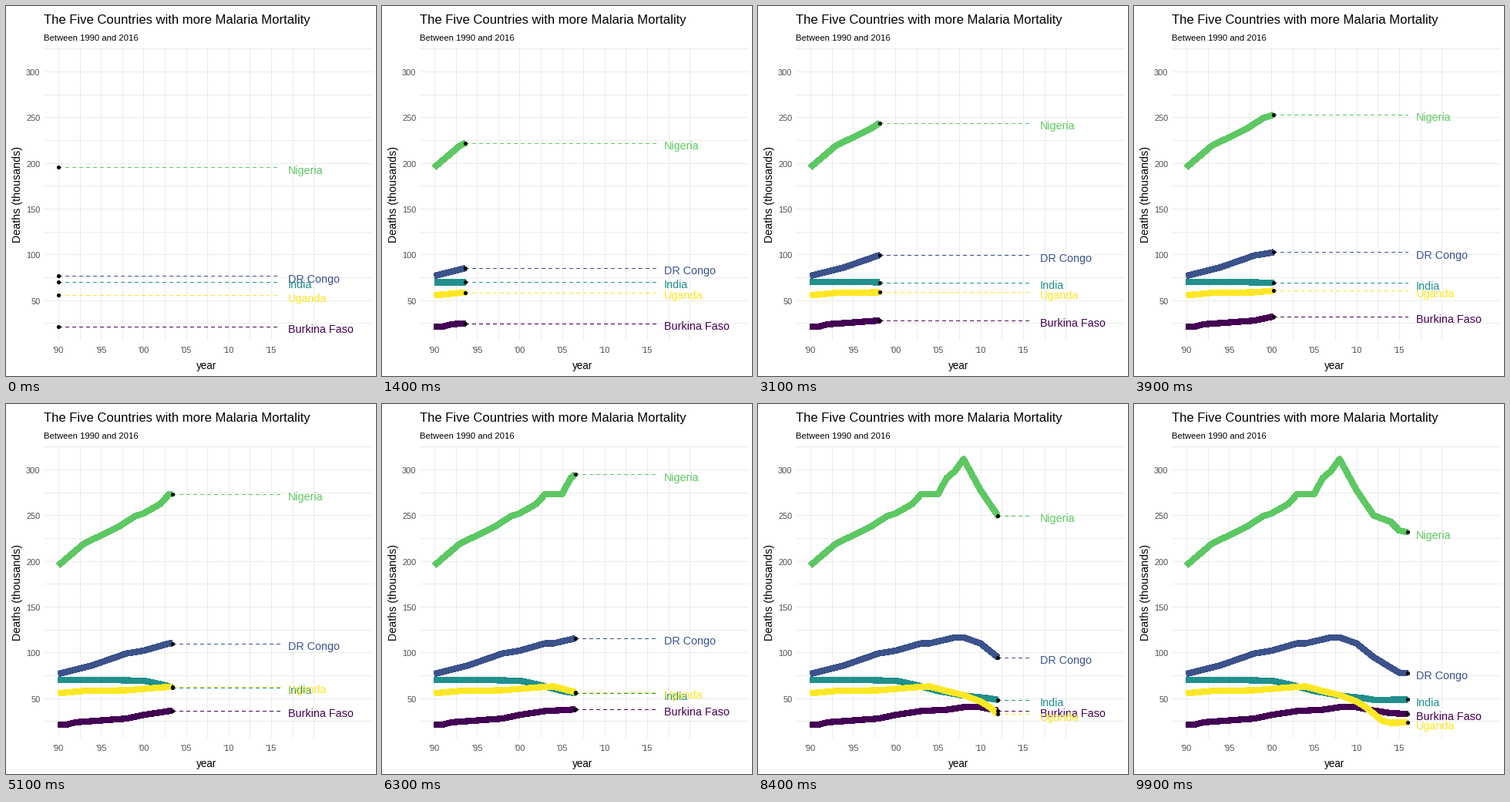
These frames come from a looping animation (480 by 480 pixels, 10000 ms). A matplotlib script:

```python
import numpy as np
import matplotlib.pyplot as plt
from matplotlib.animation import FuncAnimation

SIZE, DPI = 480, 72  # at 72 dpi one point is one pixel
FRAMES, INTERVAL = 100, 100
SPAN = 26
GRID, TICK = "#EBEBEB", "#4D4D4D"

plt.rcParams["font.family"] = "Liberation Sans"

# Turning points of each curve: (years since 1990, thousand deaths)
COUNTRIES = {
    "Burkina Faso": ("#440154", [
        (0, 21.3), (1, 21.3), (2, 23.7), (8, 27.8), (10, 31.8), (13, 36),
        (16, 37.5), (18, 40.2), (20, 40.2), (22, 36.6), (24, 33.8), (26, 32.8)]),
    "DR Congo": ("#3B528B", [
        (0, 76.6), (4, 86), (8, 99), (10, 102), (13, 110), (14, 110),
        (17, 116.5), (18, 116.5), (20, 110), (22, 95), (25, 78), (26, 77.7)]),
    "India": ("#21908C", [
        (0, 70.2), (4, 70.2), (10, 69.3), (12, 65.5), (15, 58), (18, 53),
        (21, 50), (22, 48.3), (26, 48.6)]),
    "Nigeria": ("#5DC863", [
        (0, 195.3), (3, 219), (7, 237), (9, 249), (10, 252), (12, 262.5),
        (13, 273), (15, 273), (16, 290.5), (17, 298.5), (18, 311.5), (20, 277.5),
        (22, 250), (24, 243), (25, 233.5), (26, 231.5)]),
    "Uganda": ("#FDE725", [
        (0, 55.5), (3, 58), (8, 58.7), (12, 61.8), (14, 63), (16, 58),
        (18, 53.5), (20, 46.5), (21, 41), (23, 25.5), (24, 23.2), (26, 23.5)]),
}


def px(year):
    return 67.9 + 11.04 * np.asarray(year)


def py(deaths):
    return 441.1 - 1.1866 * np.asarray(deaths)


fig = plt.figure(figsize=(SIZE / DPI, SIZE / DPI), dpi=DPI, facecolor="white")
ax = fig.add_axes([0, 0, 1, 1])
ax.set(xlim=(0, SIZE), ylim=(SIZE, 0))
ax.axis("off")


def label(x, y, text, size, color="black", **kw):
    return ax.text(x, y, text, fontsize=size, color=color, **kw)


def draw_grid():
    for v in range(25, 326, 25):
        ax.plot([49, 475], [py(v)] * 2, color=GRID, lw=1, zorder=1)
    for k in np.arange(0, 31, 2.5):
        ax.plot([px(k)] * 2, [54.5, 432.5], color=GRID, lw=1, zorder=1)


def draw_labels():
    for v in range(50, 301, 50):
        label(44.5, py(v) + 4.8, str(v), 11, TICK, ha="right")
    for k in range(0, 26, 5):
        label(px(k), 450, f"'{(90 + k) % 100:02d}", 11, TICK, ha="center")
    label(49, 23.5, "The Five Countries with more Malaria Mortality", 16.6)
    label(49, 45, "Between 1990 and 2016", 11.25)
    label(260.5, 471, "year", 13.5, ha="center")
    label(15.5, 244, "Deaths (thousands)", 14.3, rotation=90, ha="center", va="center")


class Series:
    def __init__(self, name, color, points):
        self.years, self.deaths = np.array(points).T
        self.trail, = ax.plot([], [], color=color, lw=7.2, zorder=2, antialiased=False,
                              solid_capstyle="butt", solid_joinstyle="round")
        self.guide, = ax.plot([], [], color=color, lw=1, zorder=3, antialiased=False,
                              dashes=(4, 4), dash_capstyle="butt")
        self.dot, = ax.plot([], [], "o", color="black", ms=5.2, mew=0, zorder=4)
        self.tag = label(px(27), 0, name, 14.4, color, zorder=5)

    def update(self, now):
        value = np.interp(now, self.years, self.deaths)
        x, y = px(now), py(value)
        past = self.years < now
        self.trail.set_data(px(np.append(self.years[past], now)),
                            py(np.append(self.deaths[past], value)))
        self.trail.set_visible(now > 0)
        self.guide.set_data([x, px(SPAN)], [y, y])
        self.guide.set_visible(now < SPAN)
        self.dot.set_data([x], [y])
        self.tag.set_y(y + 8.3)


draw_grid()
draw_labels()
series = [Series(name, *spec) for name, spec in COUNTRIES.items()]


def update(i):
    now = SPAN * i / (FRAMES - 1)
    for s in series:
        s.update(now)
    return []


anim = FuncAnimation(fig, update, frames=FRAMES, interval=INTERVAL,
                     repeat=True, repeat_delay=0, blit=False)
plt.show()
```
